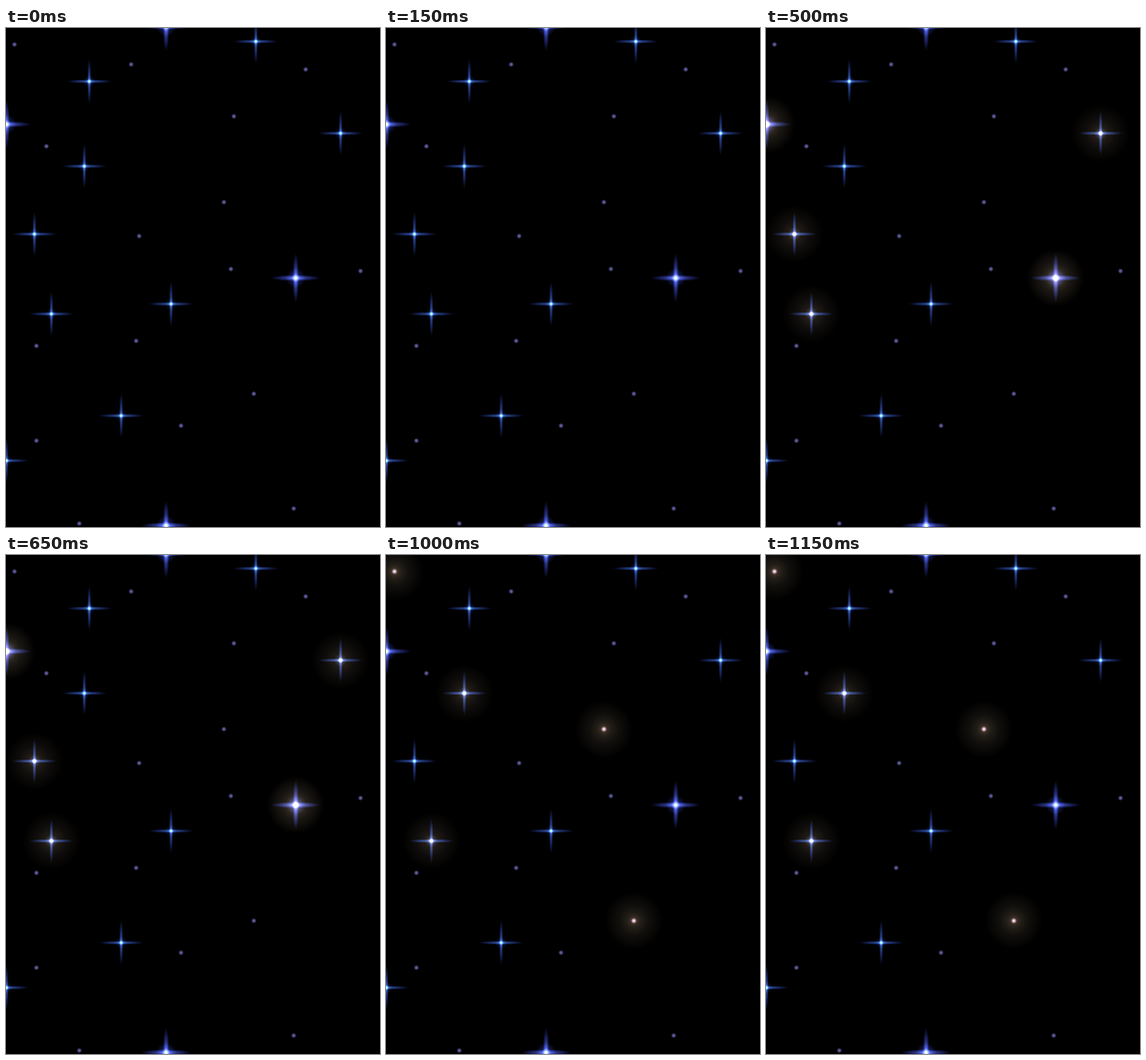
Recreate the animation shown at these times as an HTML page with a canvas. Size 375x500 px, loop 1250 ms.

```html
<!DOCTYPE html>
<html lang="en">
<head>
<meta charset="utf-8">
<title>Twinkling stars</title>
<style>
html, body { margin: 0; width: 100%; height: 100%; overflow: hidden; background: #000; }
canvas { display: block; width: 375px; height: 500px; }
</style>
</head>
<body>
<canvas id="sky" width="375" height="500"></canvas>
<script>
const ctx = document.getElementById('sky').getContext('2d');
const W = 375, H = 500, STEP = 250, STEPS = 5;

// Each body: x, y, and the steps of the loop in which it flares
const dots = [
  [8, 16, '4'], [125, 36], [300, 41], [228, 88], [40, 118], [218, 174, '4'],
  [133, 208], [225, 241], [355, 243], [30, 318], [130, 313], [248, 366, '4'],
  [175, 398], [30, 413], [288, 481], [73, 496]
];
const stars = [
  [83, 53], [250, 13], [335, 105, '12'], [78, 138, '4'], [28, 206, '23'],
  [165, 276], [45, 286, '24'], [115, 388, '3'], [0, 433]
];
const giants = [[290, 250, '123'], [0, 96, '123'], [160, 498]];

// Soft ellipse whose colours are spread evenly from the centre to a black rim
function glow(x, y, rx, ry, ...colours) {
  ctx.save();
  ctx.translate(x + 0.5, y + 0.5);
  ctx.scale(rx, ry);
  const fill = ctx.createRadialGradient(0, 0, 0, 0, 0, 1);
  colours.forEach((c, i) => fill.addColorStop(i / colours.length, `rgb(${c})`));
  fill.addColorStop(1, '#000');
  ctx.fillStyle = fill;
  ctx.fillRect(-1, -1, 2, 2);
  ctx.restore();
}

function cross(x, y, length, width, ...colours) {
  glow(x, y, length, width, ...colours);
  glow(x, y, width, length, ...colours);
}

function drawDot(x, y) {
  glow(x, y, 2.6, 2.6, '100,100,160', '75,75,130');
}

function drawStar(x, y) {
  cross(x, y, 23, 2.1, '58,92,150', '36,60,125', '17,28,70');
  glow(x, y, 6, 6, '28,48,95', '10,18,42');
  glow(x, y, 2.7, 2.7, '85,100,90', '45,60,60');
}

function drawGiant(x, y) {
  cross(x, y, 25, 3.2, '85,98,165', '50,62,145', '22,27,80');
  glow(x, y, 10, 10, '45,55,125', '18,23,65');
  glow(x, y, 4.5, 4.5, '95,95,80', '50,52,50');
}

function drawFlare(x, y, power) {
  const tint = (r, g, b) => [r, g, b].map(v => Math.round(v * power)).join();
  glow(x, y, 29, 29, tint(72, 60, 48), tint(34, 29, 23), tint(18, 16, 13), tint(9, 8, 6));
  glow(x, y, 3.4, 3.4, '110,78,48', '60,42,28');
}

function drawGroup(bodies, paint, step, power, drift) {
  for (const [x, y, lit = ''] of bodies) {
    paint(x, y);
    paint(x, y - H);   // the sky repeats downwards
    if (lit.includes(step)) drawFlare(x, y + drift, power);
  }
}

function draw(t) {
  const step = Math.floor(t / STEP) % STEPS;
  ctx.globalCompositeOperation = 'source-over';
  ctx.fillStyle = '#000';
  ctx.fillRect(0, 0, W, H);
  ctx.globalCompositeOperation = 'lighter';
  drawGroup(dots, drawDot, step, 1, 0);
  drawGroup(stars, drawStar, step, 0.9, 0);
  drawGroup(giants, drawGiant, step, 1.5, (2 - step) * 3);
}

const start = performance.now();
function tick() {
  draw(performance.now() - start);
  requestAnimationFrame(tick);
}
tick();
</script>
</body>
</html>
```
